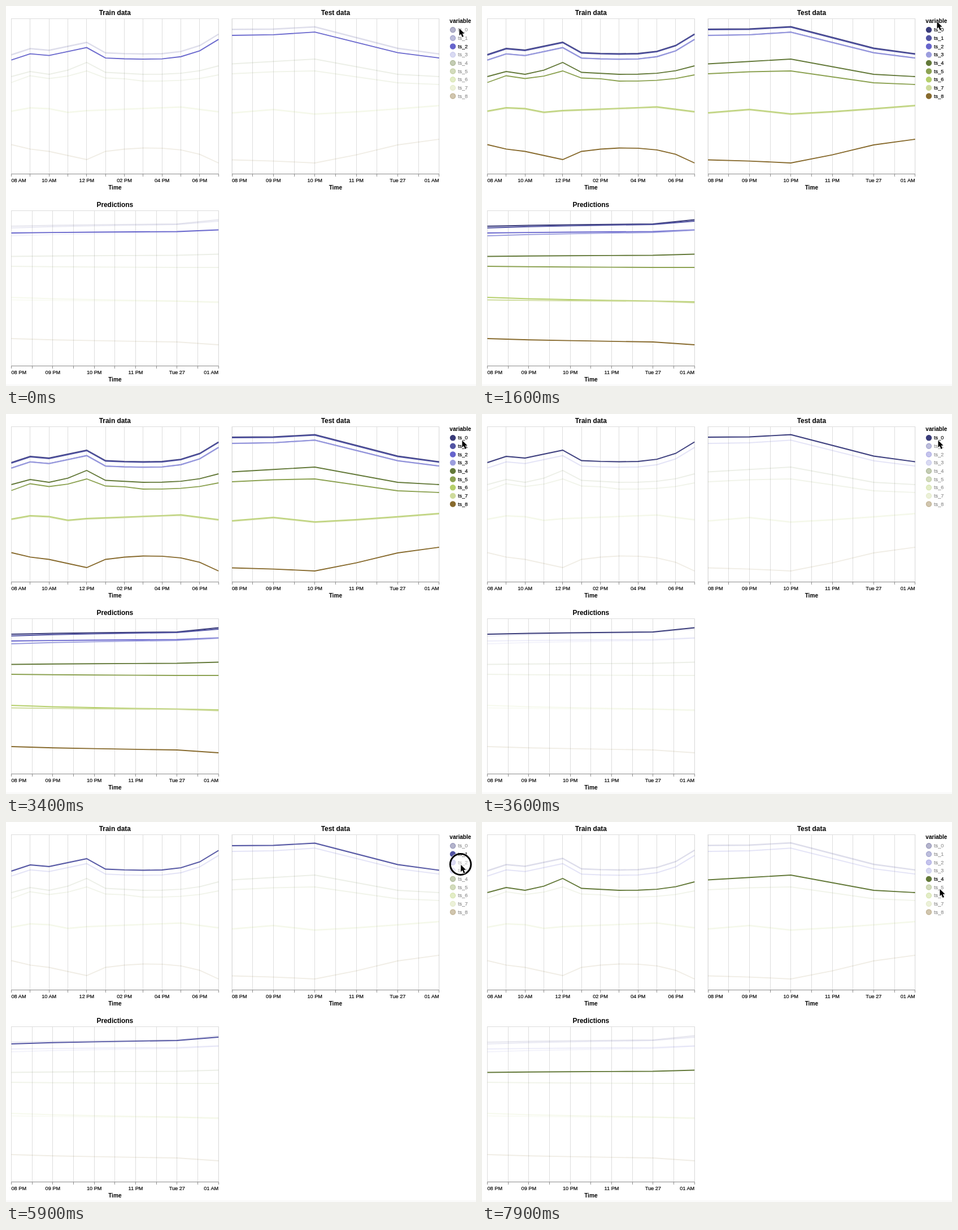
These frames come from a looping animation (832x673 px, 8000 ms). An HTML page:

```html
<!DOCTYPE html>
<html lang="en">
<head>
<meta charset="utf-8">
<title>Linked time series charts</title>
<style>
  html, body { margin: 0; width: 100%; height: 100%; overflow: hidden; background: #fff; }
  svg { display: block; width: 832px; height: 673px; }
  text { font: 9.2px "Liberation Sans", Arial, sans-serif; fill: #000; stroke: #000; stroke-width: .2px; }
  .title { font-size: 11.9px; font-weight: bold; stroke: none; }
  .heading { font-size: 10.1px; font-weight: bold; stroke: none; }
  .grid { stroke: #ddd; fill: none; }
  .axis { stroke: #8c8c8c; fill: none; }
  .line { fill: none; stroke-width: 1.85; }
</style>
</head>
<body>
<svg id="stage" viewBox="0 0 832 673"></svg>
<script>
const LOOP = 8000, STEP = 100;
const WIDTH = 366.7, HEIGHT = 275;
const COLORS = ["#393b79", "#5254a3", "#6664cc", "#9c9ede", "#637939",
                "#8ca252", "#b5cf6b", "#cedb9c", "#876a2d"];
const NIGHT = ["08 PM", "09 PM", "10 PM", "11 PM", "Tue 27", "01 AM"];

// Value at `at` on a path of keys [position, value, power]; power bends the way to that key.
function along(keys, at) {
  const next = keys.findIndex(key => key[0] > at);
  if (next < 0) return keys[keys.length - 1][1];
  const [p0, v0] = keys[next - 1], [p1, v1, power = 1] = keys[next];
  return v0 + (v1 - v0) * ((at - p0) / (p1 - p0)) ** power;
}
const trace = (...keys) => hour => along(keys, hour);
const below = (series, gap, slope = 0) => hour => series(hour) + gap + slope * hour;
const forecast = (start, knee, end) => trace([0, start], [4, knee, .7], [5, end]);

// Three of the nine series closely follow the one above them.
const family = (top, third, olive, leaf, lime, brown) =>
  [top, below(top, 1), third, below(third, .4), olive, leaf, lime, below(lime, 1.1), brown];

const trainTop = trace([0, 86], [1, 75], [2, 78], [4, 64], [5, 82.5], [7, 84.5, .5], [11, 49.5, 3]);
const train = family(
  trainTop,
  below(trainTop, 9.6),
  trace([0, 125], [1, 116], [2, 121], [4, 100, 1.5], [5, 117.5], [7, 121], [11, 106, 3]),
  trace([0, 135.5], [1, 123.5], [2, 128.5], [4, 115, 1.6], [5, 127.5], [7, 133, 2], [11, 122, 3]),
  trace([0, 186], [1, 180], [2, 181.5], [3, 188], [4, 185], [9, 178.5], [11, 187]),
  trace([0, 245.5], [2, 257.5, .6], [4, 272], [5, 257.5], [7, 251.5, .6], [11, 278, 3])
);

const testTop = trace([0, 41], [1, 40.5], [2, 36.5], [4, 74.5], [5, 84.5]);
const test = family(
  testTop,
  below(testTop, 11, -.7),
  trace([0, 102.5], [2, 94], [4, 121], [5, 125]),
  trace([0, 120], [1, 116.5], [2, 115], [4, 136], [5, 139]),
  trace([0, 189], [1, 183], [2, 191], [5, 176, 1.2]),
  trace([0, 272.5], [2, 278, 1.4], [4, 246, 1.15], [5, 236])
);

const predicted = [
  forecast(390, 386, 378.5), forecast(393, 387, 381), forecast(402, 399.5, 396.5),
  forecast(407, 401, 397), forecast(443.5, 441.5, 439.5), forecast(461, 463, 463),
  forecast(516, 522.5, 524), forecast(520.5, 523, 525.5), forecast(589, 595, 600)
];

const CHARTS = [
  { title: "Train data", x: 9.5, y: 22.5, ticks: 11, hours: 11, series: train,
    labels: ["08 AM", "10 AM", "12 PM", "02 PM", "04 PM", "06 PM"] },
  { title: "Test data", x: 400, y: 22.5, ticks: 10, hours: 5, series: test, labels: NIGHT },
  { title: "Predictions", x: 9.5, y: 362.5, ticks: 10, hours: 5, series: predicted, labels: NIGHT }
];

const POINTER_X = [[0, 802], [200, 805], [1900, 805], [2300, 803], [2900, 803], [3200, 807],
                   [3900, 807], [4300, 806], [6700, 804], [7000, 806], [7700, 806], [7900, 810]];
const POINTER_Y = [[0, 39], [200, 27], [1900, 27], [2300, 46], [3900, 46], [4600, 58], [5300, 58],
                   [5700, 75], [6300, 75], [6700, 94.5], [7000, 101], [7700, 101], [7900, 118]];
const CLICKS = [400, 900, 1100, 3500, 4900, 5900, 7200];
// Selected series from each time on; -1 shows all
const SELECTED = [[0, 2], [1200, -1], [3600, 0], [5000, 1], [6000, 2], [7300, 4]];

const stage = document.getElementById("stage");

function add(name, attrs, parent = stage) {
  const node = document.createElementNS("http://www.w3.org/2000/svg", name);
  for (const key in attrs) node.setAttribute(key, attrs[key]);
  return parent.appendChild(node);
}
function label(content, x, y, anchor = "middle", cls = "") {
  const node = add("text", { x, y, "text-anchor": anchor, class: cls });
  node.textContent = content;
  return node;
}

const lines = COLORS.map(() => []);

function drawChart({ title, x, y, ticks, hours, series, labels }) {
  const bottom = y + HEIGHT, gap = WIDTH / ticks;
  let grid = "", marks = `M${x} ${bottom}h${WIDTH}`;
  for (let i = 0; i <= ticks; i++) {
    const tx = Math.floor(x + i * gap) + .5;
    grid += `M${tx} ${y}V${bottom}`;
    marks += `M${tx} ${bottom}v4.6`;
  }
  add("rect", { x, y, width: WIDTH, height: HEIGHT, class: "grid" });
  add("path", { d: grid, class: "grid" });
  add("path", { d: marks, class: "axis" });
  series.forEach((valueAt, i) => {
    const points = Array.from({ length: hours + 1 },
      (_, hour) => `${x + hour * WIDTH / hours},${valueAt(hour)}`);
    lines[i].push(add("polyline", { points: points.join(" "), stroke: COLORS[i], class: "line" }));
  });
  labels.forEach((name, i) => {
    const at = 2 * i;
    const anchor = at === 0 ? "start" : at === ticks ? "end" : "middle";
    label(name, x + at * gap, bottom + 14, anchor);
  });
  label(title, x + WIDTH / 2, y - 6.8, "middle", "title");
  label("Time", x + WIDTH / 2, bottom + 27.7, "middle", "heading");
}

CHARTS.forEach(drawChart);
add("rect", { y: 670, width: 832, height: 3, fill: "#fafafa" });

label("variable", 785.3, 30.3, "start", "heading");
const legend = COLORS.map((color, i) => {
  const y = 42.2 + i * 14.67;
  return [
    add("circle", { cx: 791, cy: y, r: 4.6, fill: color, stroke: color, "stroke-width": 1.3 }),
    label("ts_" + i, 800, y + 3.2, "start")
  ];
});

const pointer = add("g", {});
const ring = add("g", {}, pointer);
add("circle", { r: 20.3, fill: "#fff", "fill-opacity": .4, stroke: "#fff", "stroke-width": 1 }, ring);
add("circle", { r: 18.4, fill: "none", stroke: "#000", "stroke-width": 3 }, ring);
add("path", {
  d: "M.5 .8V13.2L3.3 10.6L5.6 16L8 15L5.8 9.7H9.6Z",
  fill: "#000", stroke: "#fff", "stroke-width": 1.4, "paint-order": "stroke"
}, pointer);

let shown;
function select(index) {
  if (index === shown) return;
  shown = index;
  COLORS.forEach((_, i) => {
    const on = index < 0 || index === i;
    lines[i].forEach(line => line.setAttribute("stroke-opacity", on ? 1 : .12));
    for (const part of legend[i]) {
      part.setAttribute("fill-opacity", on ? 1 : .38);
      part.setAttribute("stroke-opacity", on ? 1 : .38);
    }
  });
}

function render(now) {
  const t = Math.floor((now % LOOP) / STEP) * STEP;
  select(SELECTED.filter(s => s[0] <= t).pop()[1]);
  pointer.setAttribute("transform", `translate(${along(POINTER_X, t)} ${along(POINTER_Y, t)})`);
  ring.setAttribute("visibility", CLICKS.includes(t) ? "visible" : "hidden");
}

const start = performance.now();
function tick() {
  render(performance.now() - start);
  requestAnimationFrame(tick);
}
tick();
</script>
</body>
</html>
```
